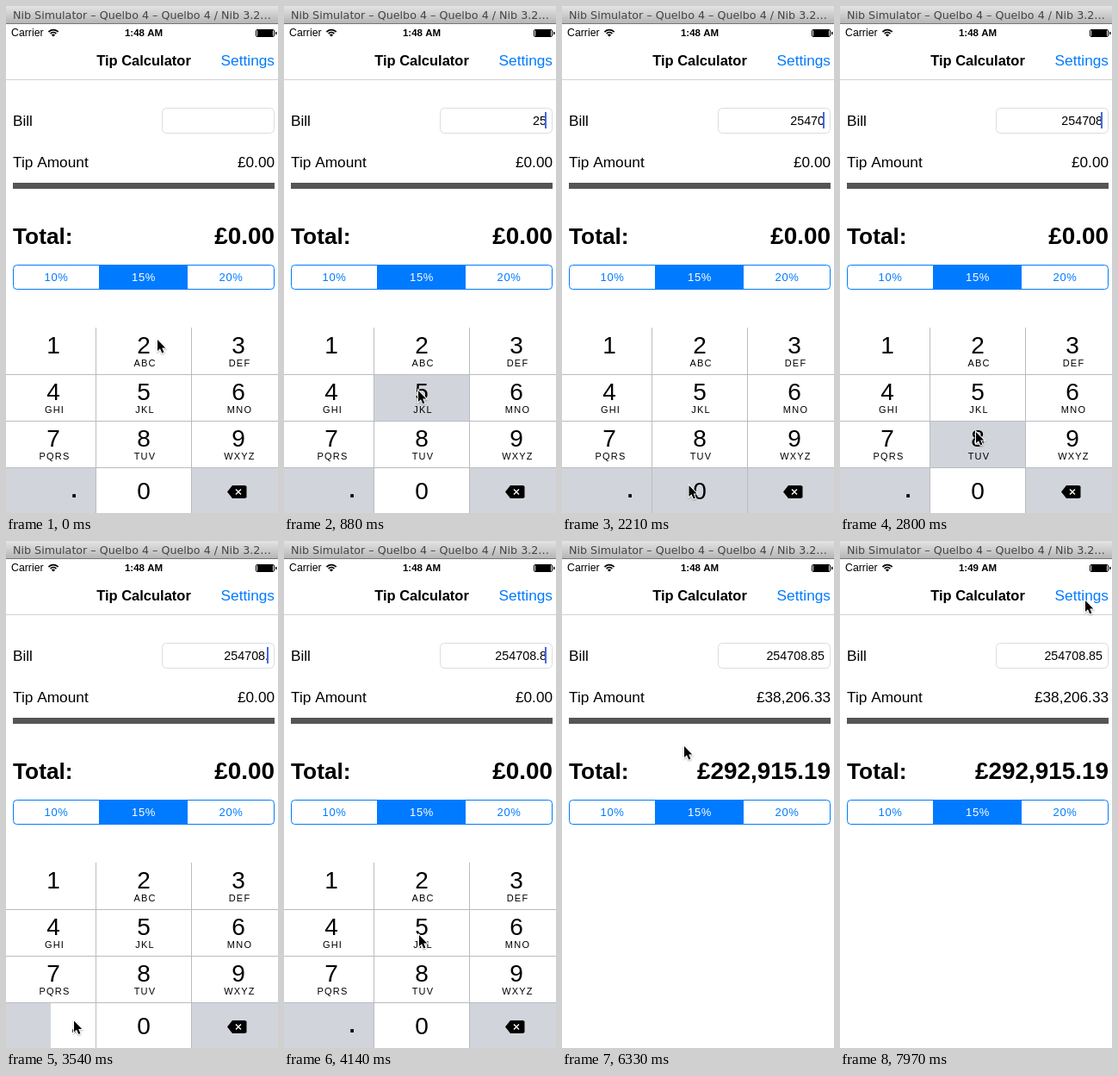
Write an HTML page with a canvas that moves like this. It is 316 px wide and 588 px high and loops after 8 s.

```html
<!DOCTYPE html>
<html lang="en">
<head>
<meta charset="utf-8">
<title>Tip Calculator</title>
<style>
html, body { margin: 0; width: 100%; height: 100%; overflow: hidden; background: #fff; }
canvas { display: block; }
</style>
</head>
<body>
<canvas id="stage" width="316" height="588"></canvas>
<script>
const ctx = document.getElementById('stage').getContext('2d');
const LOOP = 8000, STEP = 147.2;
const SANS = '"Liberation Sans", Arial, sans-serif';
const BLUE = '#007aff', KEY_GREY = '#d1d5db', LINE = '#b9bbbf';
const KEY_TOP = 373, ROW = 54;
const COLS = [[0, 104, 55], [105, 110, 160], [216, 100, 270]];
const LETTERS = ['', 'ABC', 'DEF', 'GHI', 'JKL', 'MNO', 'PQRS', 'TUV', 'WXYZ'];

// Pointer path: step, x, y
const PATH = [
  [0, 176, 387], [2, 165, 389], [4, 158, 440], [5, 156, 446], [7, 62, 455],
  [8, 38, 462], [9, 50, 461], [10, 65, 485], [11, 63, 498], [12, 70, 502],
  [14, 140, 552], [16, 155, 560], [18, 158, 505], [19, 158, 494], [20, 156, 497],
  [23, 80, 556], [25, 78, 557], [26, 148, 508], [27, 156, 494], [28, 157, 457],
  [30, 157, 450], [33, 150, 264], [34, 149, 242], [38, 147, 241], [43, 142, 238],
  [45, 138, 250], [48, 124, 323], [49, 124, 320], [54, 285, 69]
];

// Typed characters and the step at which each lands
const TYPED = [['2', 2], ['5', 5], ['4', 9], ['7', 12], ['0', 15], ['8', 18], ['.', 24], ['8', 27], ['5', 29]];
// Pressed keys: key, first step, last step
const PRESSES = [['2', 2, 2], ['5', 5, 5], ['4', 9, 9], ['7', 11, 12], ['0', 15, 15],
  ['8', 18, 19], ['.', 24, 24], ['8', 27, 27], ['5', 29, 29]];
const DONE = 36, NEW_MINUTE = 46;

function text(str, x, y, size, { align = 'left', weight = '', color = '#000', gap = 0, family = SANS } = {}) {
  ctx.font = `${weight} ${size}px ${family}`;
  ctx.textAlign = align;
  ctx.fillStyle = color;
  ctx.letterSpacing = gap + 'px';
  ctx.fillText(str, x, y);
}

function rect(x, y, w, h, color) {
  ctx.fillStyle = color;
  ctx.fillRect(x, y, w, h);
}

function roundBox(x, y, w, h, r, color) {
  ctx.beginPath();
  ctx.roundRect(x, y, w, h, r);
  ctx.strokeStyle = color;
  ctx.lineWidth = 1;
  ctx.stroke();
}

function polygon(points) {
  ctx.beginPath();
  points.forEach(([x, y]) => ctx.lineTo(x, y));
  ctx.closePath();
}

function drawWindowBar() {
  const shade = ctx.createLinearGradient(0, 0, 0, 20);
  shade.addColorStop(0, '#e4e4e4');
  shade.addColorStop(1, '#b6b6b6');
  rect(0, 0, 316, 20, shade);
  rect(0, 20, 316, 1, '#777');
  text('Nib Simulator – Quelbo 4 – Quelbo 4 / Nib 3.2…', 8, 15, 12.7,
    { color: '#444', family: '"DejaVu Sans", sans-serif' });
}

function drawStatus(step) {
  text('Carrier', 6, 35, 12.3);
  ctx.strokeStyle = '#000';
  ctx.lineWidth = 1.7;
  for (const r of [4.4, 7.4]) {
    ctx.beginPath();
    ctx.arc(55, 35, r, -Math.PI * 0.77, -Math.PI * 0.23);
    ctx.stroke();
  }
  ctx.beginPath();
  ctx.moveTo(55, 35.5);
  ctx.arc(55, 35.5, 2.8, -Math.PI * 0.77, -Math.PI * 0.23);
  ctx.fill();
  text(step < NEW_MINUTE ? '1:48 AM' : '1:49 AM', 160, 35, 11.5, { align: 'center', weight: 'bold' });
  roundBox(290.5, 27.5, 21, 8, 1.5, '#000');
  rect(292, 28, 18, 7, '#000');
  rect(313, 30, 1.5, 3, '#000');
}

function drawForm(step) {
  const done = step >= DONE;
  const right = { align: 'right' };
  text('Tip Calculator', 160, 69, 16.5, { align: 'center', weight: 'bold' });
  text('Settings', 312, 69, 17.3, { align: 'right', color: BLUE });
  rect(0, 85, 316, 1, '#d2d2d4');

  text('Bill', 8, 139, 17.2);
  roundBox(181.5, 118.5, 130, 29, 5, '#dcdcdc');
  const bill = TYPED.filter(([, at]) => step >= at).map(([ch]) => ch).join('');
  text(bill, 305, 138, 14.3, right);
  ctx.globalAlpha = caretAlpha(step);
  rect(303, 123, 2, 19, '#4468e0');
  ctx.globalAlpha = 1;

  text('Tip Amount', 8, 187, 17.3);
  text(done ? '£38,206.33' : '£0.00', 312, 187, 17.2, right);
  rect(8, 205, 304, 7, '#555');
  text('Total:', 8, 276, 26.3, { weight: 'bold' });
  text(done ? '£292,915.19' : '£0.00', 312, 276, 27.9, { align: 'right', weight: 'bold' });

  roundBox(8.5, 300.5, 303, 28, 4, BLUE);
  rect(108, 300, 103, 29, BLUE);
  ['10%', '15%', '20%'].forEach((label, i) =>
    text(label, 58.5 + i * 101.5, 319, 13, { align: 'center', color: i === 1 ? '#fff' : BLUE, gap: 0.6 }));
}

function caretAlpha(step) {
  if (step < 2 || step === 21 || step === 22 || step > 34) return 0;
  return step === 34 ? 0.18 : step === 33 ? 0.7 : 1;
}

function drawKey(index, down) {
  const row = Math.floor(index / 3);
  const [x, w, mid] = COLS[index % 3];
  const y = KEY_TOP + row * ROW;
  const label = index < 9 ? String(index + 1) : ['.', '0', ''][index - 9];
  const grey = index === 9 || index === 11;
  rect(x, y, w, ROW + 1, grey || down === label ? KEY_GREY : '#fff');
  if (index === 9) {
    if (down === '.') rect(52, y, 52, ROW + 1, '#fff');
    text('.', 79, 570, 26, { align: 'center', weight: 'bold' });
  } else if (index === 11) {
    drawBackspace();
  } else {
    text(label, mid, y + (index === 10 ? 37 : 30), 28, { align: 'center' });
    if (index < 9) text(LETTERS[index], mid + 1.5, y + 45, 11, { align: 'center', gap: 1.2 });
  }
}

function drawBackspace() {
  polygon([[257, 563.5], [263, 556], [278, 556], [279.5, 557.5], [279.5, 569.5], [278, 571], [263, 571]]);
  ctx.fillStyle = '#000';
  ctx.fill();
  ctx.beginPath();
  for (const d of [-3, 3]) {
    ctx.moveTo(270 - 3, 563.5 - d);
    ctx.lineTo(270 + 3, 563.5 + d);
  }
  ctx.strokeStyle = '#fff';
  ctx.lineWidth = 1.4;
  ctx.stroke();
}

function drawKeypad(step) {
  const p = Math.min(1, Math.max(0, (step - 35.4) / 2.4));
  if (p === 1) return;
  const press = PRESSES.find(([, from, to]) => step >= from && step <= to);
  ctx.save();
  ctx.translate(0, 215 * p * p * (3 - 2 * p));
  for (let i = 0; i < 12; i++) drawKey(i, press && press[0]);
  for (let r = 1; r < 4; r++) rect(0, KEY_TOP + r * ROW, 316, 1, LINE);
  rect(104, KEY_TOP, 1, 215, LINE);
  rect(215, KEY_TOP, 1, 215, LINE);
  ctx.restore();
}

function drawPointer(step) {
  const i = Math.max(1, PATH.findIndex(([at]) => at >= step));
  const [t0, x0, y0] = PATH[i - 1], [t1, x1, y1] = PATH[i];
  const p = (step - t0) / (t1 - t0);
  ctx.save();
  ctx.translate(x0 + (x1 - x0) * p, y0 + (y1 - y0) * p);
  polygon([[0, 0], [0, 13], [3, 10.3], [5.3, 15.5], [7.4, 14.6], [5.2, 9.5], [9.2, 9.5]]);
  ctx.shadowColor = 'rgba(0,0,0,.3)';
  ctx.shadowBlur = 2;
  ctx.shadowOffsetY = 1;
  ctx.strokeStyle = '#fff';
  ctx.lineWidth = 2;
  ctx.stroke();
  ctx.shadowColor = 'transparent';
  ctx.fillStyle = '#000';
  ctx.fill();
  ctx.restore();
}

function draw(now) {
  const step = Math.floor((now % LOOP) / STEP);
  rect(0, 0, 316, 588, '#fff');
  drawWindowBar();
  drawStatus(step);
  drawForm(step);
  drawKeypad(step);
  drawPointer(step);
}

let start;
function tick(now) {
  start ??= now;
  draw(now - start);
  requestAnimationFrame(tick);
}
draw(0);
requestAnimationFrame(tick);
</script>
</body>
</html>
```
